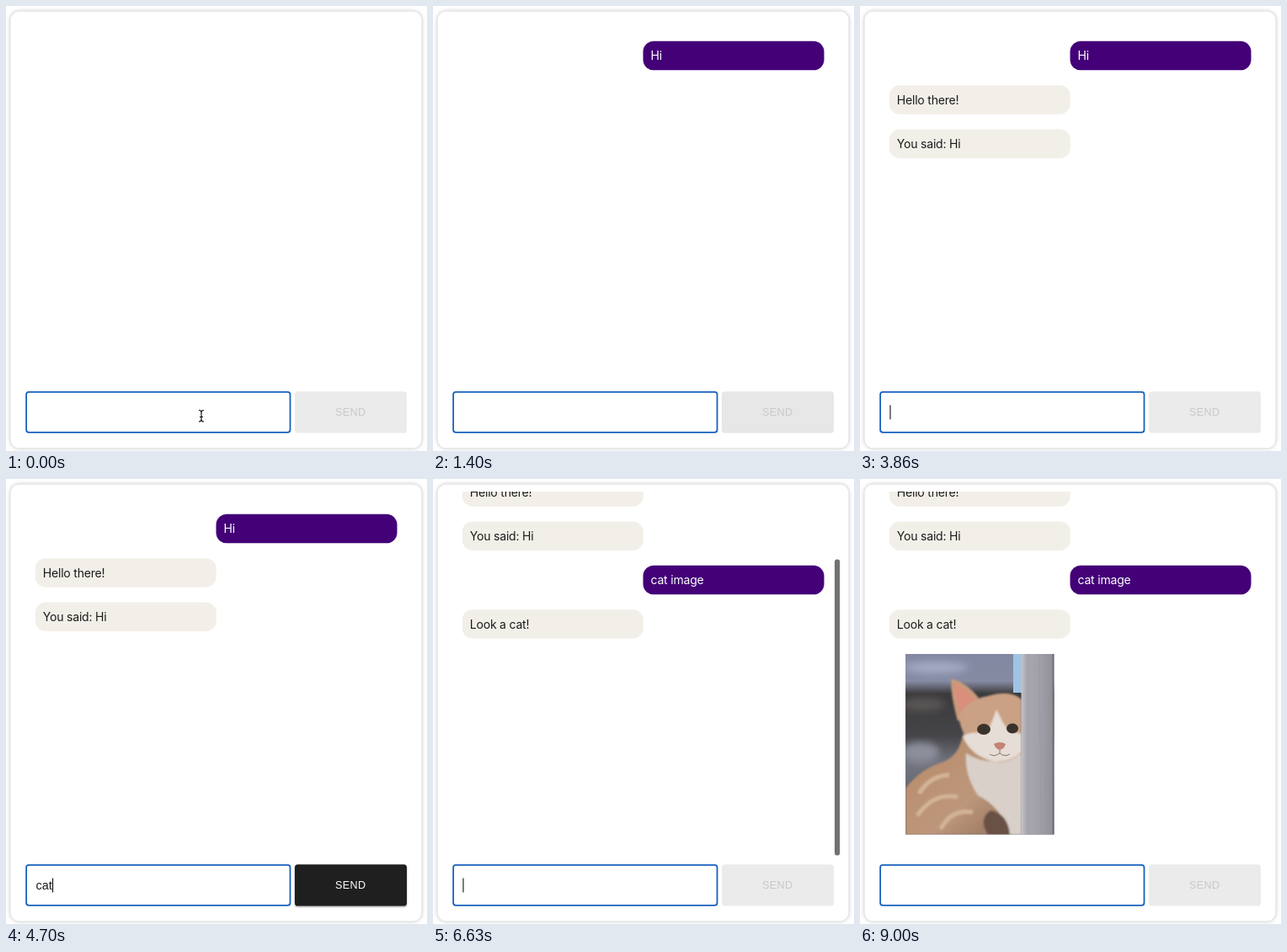
Write an HTML page that moves like this. It is 500 px wide and 529 px high and loops after 9.04 s.

```html
<!DOCTYPE html>
<html lang="en">
<head>
<meta charset="utf-8">
<title>Chat</title>
<style>
  html, body { margin: 0; width: 100%; height: 100%; overflow: hidden; background: #fff; }
  svg { display: block; width: 100%; height: 100%; }
  .card { fill: #fff; filter: drop-shadow(0 0 2.5px rgba(0, 0, 0, .28)); }
  .msg { font: 14px Inter, sans-serif; letter-spacing: -.2px; }
  #typed { font: 14.4px "Liberation Sans", Arial, sans-serif; letter-spacing: .13px; white-space: pre; fill: #1c1c1c; }
  #label { font: 12.6px "Liberation Sans", Arial, sans-serif; letter-spacing: .36px; }
</style>
</head>
<body>
<svg viewBox="0 0 500 529">
  <defs>
    <clipPath id="view"><rect x="6" y="15" width="487" height="434"/></clipPath>
    <clipPath id="frame"><rect x="54" y="208" width="176.5" height="214.5"/></clipPath>
    <filter id="soft" x="-30%" y="-30%" width="160%" height="160%"><feGaussianBlur stdDeviation="4"/></filter>
    <filter id="fur" x="-20%" y="-20%" width="140%" height="140%"><feGaussianBlur stdDeviation="1.2"/></filter>
    <linearGradient id="stone" x2="0" y2="1">
      <stop stop-color="#8388a2"/><stop offset=".15" stop-color="#868ba3"/>
      <stop offset=".22" stop-color="#3b3a3c"/><stop offset=".45" stop-color="#454448"/>
      <stop offset=".6" stop-color="#73757f"/><stop offset="1" stop-color="#54535a"/>
    </linearGradient>
    <linearGradient id="post">
      <stop stop-color="#c6c4c9"/><stop offset=".15" stop-color="#a9a8b0"/>
      <stop offset=".6" stop-color="#a09fa8"/><stop offset=".93" stop-color="#92919a"/>
      <stop offset="1" stop-color="#55535a"/>
    </linearGradient>
    <linearGradient id="coat" x2="1" y2="1">
      <stop stop-color="#b98a68"/><stop offset=".6" stop-color="#bd977b"/><stop offset="1" stop-color="#8c6b56"/>
    </linearGradient>
  </defs>

  <rect class="card" x="5.5" y="6.5" width="488" height="519" rx="10"/>
  <g clip-path="url(#view)"><g id="list"></g></g>

  <g id="photo" clip-path="url(#frame)">
    <rect x="54" y="208" width="177" height="215" fill="url(#stone)"/>
    <g filter="url(#soft)">
      <ellipse cx="90" cy="224" rx="38" ry="7" fill="#a4a9c4"/>
      <ellipse cx="75" cy="268" rx="26" ry="8" fill="#5a5554"/>
      <ellipse cx="72" cy="325" rx="22" ry="12" fill="#8c8f9b"/>
    </g>
    <rect x="182" y="208" width="11" height="46" fill="#9fc4e6"/>
    <g filter="url(#fur)">
      <path d="M54 368Q72 344 100 336Q118 328 122 304L192 310V423H54Z" fill="url(#coat)"/>
      <path d="M126 326Q155 345 192 326V423H178Q168 390 140 376Q124 352 126 326Z" fill="#d9d0c9"/>
      <path d="M152 423Q140 404 155 394Q176 398 178 423Z" fill="#6a5145"/>
      <path d="M70 374Q84 352 106 352M68 400Q88 372 116 378M96 416Q108 392 134 396" fill="none" stroke="#d3b497" stroke-width="5"/>
      <path d="M116 288Q106 250 109 237Q130 244 142 262Z" fill="#c99b7c"/>
      <path d="M119 278Q110 254 112 242Q127 249 136 263Z" fill="#d98f7c"/>
      <path d="M117 284Q126 262 152 258Q178 250 192 262V325Q178 339 160 336Q128 330 117 284Z" fill="#caa184"/>
      <path d="M162 274Q156 292 150 302Q128 300 122 306Q132 330 160 336Q180 337 192 324V302Q178 304 170 290Z" fill="#e6ddd6"/>
    </g>
    <ellipse cx="147" cy="297.5" rx="8" ry="6.5" fill="#39332c"/>
    <ellipse cx="181" cy="296.5" rx="7" ry="6" fill="#39332c"/>
    <path d="M159 315Q166 311 173 315Q171 321 166 322Q161 321 159 315Z" fill="#c38375"/>
    <path d="M166 322V326Q159 331 154 327M166 326Q172 331 178 327" fill="none" stroke="#8e7468"/>
    <rect x="191.5" y="208" width="39" height="215" fill="url(#post)"/>
    <path d="M200 208V423M213 208L215 423" stroke="#8d8c95" stroke-opacity=".35"/>
  </g>

  <rect id="bar" x="477" y="95.5" width="6.2" height="352" rx="3" fill="#717171"/>

  <rect x="24.1" y="458.8" width="313.4" height="48" rx="3" fill="#fff" stroke="#1861bd" stroke-width="1.8"/>
  <text id="typed" x="35.4" y="487.6"></text>
  <rect id="caret" y="474.5" width="1.1" height="17" fill="#111"/>
  <g id="pointer" fill="none">
    <path id="beam" d="M229 480.5Q232 480.5 232 483Q232 480.5 235 480.5M232 483V491.5M230 488.5H234M229 494Q232 494 232 491.5Q232 494 235 494" stroke="#111" stroke-width="1.2"/>
  </g>

  <rect id="button" x="343" y="458.2" width="133" height="49.3" rx="3.6"/>
  <text id="label" x="409.2" y="487.4" text-anchor="middle">SEND</text>
</svg>

<script>
const LOOP = 9040, SCROLL_AT = 6630, SCROLL = 96, PHOTO_AT = 7200;
const $ = id => document.getElementById(id);

const messages = [
  [1230, 'Hi', true],
  [2200, 'Hello there!'],
  [2700, 'You said: Hi'],
  [5500, 'cat image', true],
  [6630, 'Look a cat!']
];
const input = [
  [0, ''], [630, 'H'], [860, 'Hi'], [1230, ''],
  [4330, 'c'], [4530, 'ca'], [4700, 'cat'], [4860, 'cat '],
  [5030, 'cat i'], [5100, 'cat im'], [5170, 'cat ima'], [5230, 'cat imag'], [5300, 'cat image'],
  [5500, '']
];
const blinks = [160, 1360, 1860, 2400, 2860, 3360, 3860, 5800, 6300, 6800, 7300, 7800, 8300, 8800];

function add(tag, parent, attrs) {
  const el = document.createElementNS('http://www.w3.org/2000/svg', tag);
  for (const k in attrs) el.setAttribute(k, attrs[k]);
  return parent.appendChild(el);
}

const bubbles = messages.map(([at, text, mine], i) => {
  const g = add('g', $('list'), {}), x = mine ? 249.5 : 34.8, y = 41.8 + i * 52.35;
  add('rect', g, { x, y, width: 215, height: 34.5, rx: 12.5, fill: mine ? '#430077' : '#f2efe9' });
  add('text', g, { x: x + 9, y: y + 22.5, class: 'msg', fill: mine ? '#fff' : '#1b1b1b' }).textContent = text;
  return { at, g };
});

const clamp = x => Math.min(1, Math.max(0, x));
const mix = (a, b, p) => Math.round(a + (b - a) * p);
const grey = v => `rgb(${v},${v},${v})`;
const show = (el, on) => el.setAttribute('visibility', on ? 'visible' : 'hidden');

// cubic-bezier(.4, 0, .2, 1), solved by bisection
function ease(x) {
  let lo = 0, hi = 1, u;
  for (let i = 0; i < 16; i++) {
    u = (lo + hi) / 2;
    if (1.2 * u * (1 - u) ** 2 + .6 * u * u * (1 - u) + u ** 3 < x) lo = u; else hi = u;
  }
  return u * u * (3 - 2 * u);
}
const ramp = (t, start, length) => ease(clamp((t - start) / length));
const active = t => ramp(t, 630, 250) - ramp(t, 1230, 210) + ramp(t, 4330, 250) - ramp(t, 5500, 230);

function draw(t) {
  for (const { at, g } of bubbles) show(g, t >= at);
  $('list').setAttribute('transform', `translate(0 ${t >= SCROLL_AT ? -SCROLL : 0})`);
  show($('photo'), t >= PHOTO_AT);
  show($('bar'), t >= SCROLL_AT);
  $('bar').setAttribute('opacity', 1 - clamp((t - PHOTO_AT) / 200));

  const text = input.filter(k => k[0] <= t).pop()[1];
  $('typed').textContent = text;
  $('caret').setAttribute('x', 35.4 + (text ? $('typed').getComputedTextLength() : 0));
  show($('caret'), blinks.filter(b => b <= t).length % 2);
  show($('pointer'), t < 630);

  const p = active(t);
  $('button').setAttribute('fill', grey(mix(235, 31, p)));
  $('button').style.filter = p > .01 ? `drop-shadow(0 1px 1px rgba(0,0,0,${.4 * p}))` : 'none';
  $('label').setAttribute('fill', grey(mix(200, 255, p)));
}

const start = performance.now();
function tick() {
  draw((performance.now() - start) % LOOP);
  requestAnimationFrame(tick);
}
tick();
</script>
</body>
</html>
```
